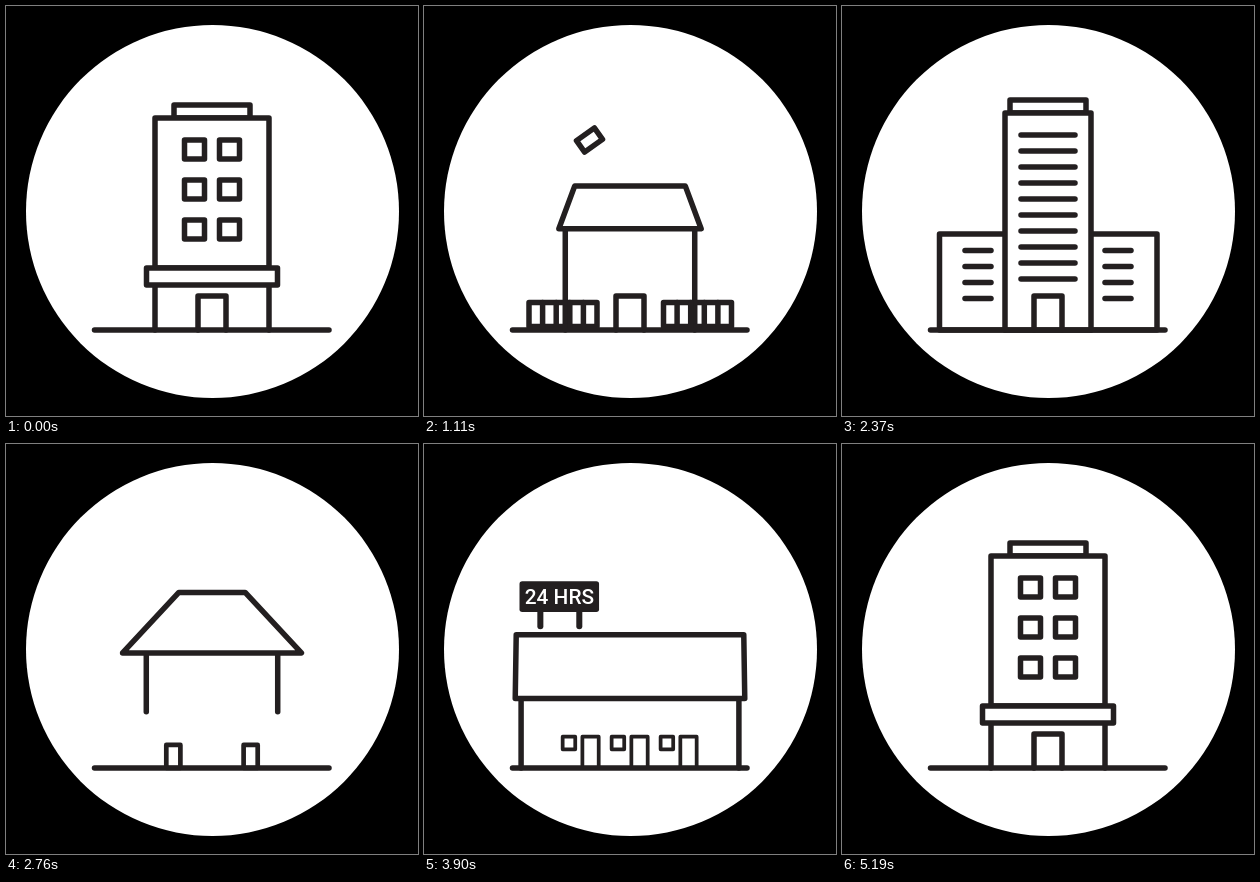
Animation of 412x410 px, one loop 5.49 s. Source, as an HTML page with a canvas:

```html
<!DOCTYPE html>
<html lang="en">
<head>
<meta charset="utf-8">
<title>Buildings</title>
<style>
  html, body { margin: 0; width: 100%; height: 100%; overflow: hidden; background: #000; }
  canvas { display: block; }
</style>
</head>
<body>
<canvas id="stage" width="412" height="410"></canvas>
<script>
const c = document.getElementById('stage').getContext('2d');
const LOOP = 5490, MID = 206, GROUND = 324, INK = '#231f20';
let now = 0;

const clamp = u => Math.min(1, Math.max(0, u));
const spring = u => 1 - Math.exp(-5 * u) * (1 - u) * Math.cos(9 * u);
const easeIn = u => u * u;
const easeOut = u => 1 - (1 - u) ** 2;
const backIn = u => u * u * (2.7 * u - 1.7);

// Main shape: half width at top and bottom, top y, bottom y; then half width and foot of the walls.
const pose = {
  tower: [57, 57, 112, 262, 57, GROUND],
  house: [33, 90, 149, 207.5, 65, GROUND],
  squash: [55.5, 71.5, 181, 221.5, 65, GROUND],
  office: [43, 43, 107, GROUND, 43, GROUND],
  bungalow: [33, 90, 149, 207.5, 66, 267],
  wide: [114, 115, 191, 254.5, 109, GROUND],
  motel: [105, 105.5, 183.5, 254, 105, GROUND]
};
const morphs = [
  [150, 600, 'house', spring],
  [1000, 1110, 'squash', easeIn],
  [1110, 1600, 'office', spring],
  [2480, 2950, 'bungalow', spring],
  [3300, 3900, 'wide', easeOut],
  [3900, 4150, 'motel', spring],
  [4650, 5150, 'tower', spring]
];

function shapeAt(t) {
  let cur = pose.tower;
  for (const [from, to, name, ease] of morphs) {
    if (t < from) break;
    const k = ease(clamp((t - from) / (to - from)));
    cur = cur.map((v, i) => v + (pose[name][i] - v) * k);
  }
  return cur;
}

// Scale of a part that springs in at one time and shrinks away at another, across the loop if needed.
function pop(start, end) {
  let t = now;
  if (end < start) {
    end += LOOP;
    if (t < start) t += LOOP;
  }
  if (t <= start) return 0;
  return Math.max(0, spring(clamp((t - start) / 300)) - backIn(clamp((t - end) / 150)));
}

function part(start, end, x, y, draw) {
  const s = pop(start, end);
  if (s < 0.01) return;
  c.save();
  c.translate(x, y);
  c.scale(s, s);
  c.translate(-x, -y);
  draw();
  c.restore();
}

function path(points, closed) {
  c.beginPath();
  points.forEach(p => c.lineTo(...p));
  if (closed) {
    c.closePath();
    c.fill();
  }
  c.stroke();
}
const line = (x1, y1, x2, y2) => path([[x1, y1], [x2, y2]]);
const box = (x, y, w, h) => path([[x, y], [x + w, y], [x + w, y + h], [x, y + h]], true);

function rails(x, y, w, h, n) {
  box(x, y, w, h);
  for (let i = 1; i < n; i++) line(x + w * i / n, y, x + w * i / n, y + h);
}

function rooms(floor) {
  for (let i = 0; i < 3; i++) {
    const x = 107 + 72 * i;
    box(x, floor - 46, 18.5, 18.5);
    path([[x + 29, floor], [x + 29, floor - 46], [x + 53, floor - 46], [x + 53, floor]]);
  }
}

function stripe(start, x, y, w) {
  const s = pop(start, 2400);
  if (s > 0.01) line(x, y, x + w * s, y);
}

function chimney() {
  const k = easeOut(clamp((now - 1000) / 110));
  const s = pop(540, 1110);
  if (s < 0.01) return;
  c.save();
  c.translate(158 + 7.5 * k, 152 - 18 * k);
  c.rotate((54 * k + 0.4 * Math.max(0, now - 1110)) * Math.PI / 180);
  c.scale(s, s);
  box(-7, -11, 14, 22);
  c.restore();
}

function sign() {
  c.fillStyle = INK;
  line(118, 170, 118, 183);
  line(153.5, 170, 153.5, 183);
  c.beginPath();
  c.roundRect(99, 142, 72.5, 28, 2.5);
  c.fill();
  c.fillStyle = '#fff';
  c.font = '500 19px Roboto, sans-serif';
  c.fillText('24 HRS', 135.3, 156.8);
}

function draw() {
  const [top, bottom, y, rawBase, wall, rawFoot] = shapeAt(now);
  const base = Math.min(rawBase, GROUND), foot = Math.min(rawFoot, GROUND);

  c.fillStyle = '#000';
  c.fillRect(0, 0, 412, 410);
  c.fillStyle = '#fff';
  c.beginPath();
  c.arc(206.5, 205.5, 186.5, 0, 7);
  c.fill();
  c.strokeStyle = INK;
  c.lineWidth = 5.5;
  c.lineCap = c.lineJoin = 'round';
  c.textAlign = 'center';
  c.textBaseline = 'middle';

  // Behind the main shape
  const wings = pop(1380, 2430);
  if (wings > 0.02) box(97.5, GROUND - 96 * wings, 217.5, 96 * wings);
  const cap = () => box(168, y - 13, 76, 13);
  part(4860, 50, MID, y, cap);
  part(1330, 2420, MID, y, cap);
  chimney();
  part(3790, 4660, 135, 190, sign);
  part(2720, 3330, MID, GROUND, () => {
    box(152.5, 297, 16.5, 27);
    box(243, 297, 16.5, 27);
  });

  for (const side of [-1, 1]) line(MID + side * wall, base, MID + side * wall, foot);
  path([[MID - top, y], [MID + top, y], [MID + bottom, base], [MID - bottom, base]], true);

  // Tower
  for (let i = 0; i < 6; i++) {
    const x = 188.5 + 35 * (i % 2), wy = 143.5 + 40 * (i >> 1);
    part(4890 + 8 * i, 30 + 10 * i, x, wy, () => box(x - 10, wy - 9.5, 20, 19));
  }
  part(4860, 120, MID, 270, () => box(140.5, 262, 131, 17));
  part(4850, 2400, MID, GROUND, () =>
    path([[192, GROUND], [192, 290], [220, 290], [220, GROUND]]));

  // House
  for (const x of [105, 239.5])
    part(600, 1120, x + 34, GROUND, () => {
      c.fillStyle = 'transparent';
      rails(x, 296.5, 68, 24, 5);
    });

  // Office
  for (let i = 0; i < 10; i++) stripe(1650 + 25 * i, 179, 129 + 16 * i, 54);
  for (let i = 0; i < 4; i++)
    for (const x of [123, 263]) stripe(1750 + 60 * i, x, 244.5 + 16 * i, 26);

  // Bungalow
  part(2800, 3280, MID, 234, () => box(165, 220.5, 82.5, 27));
  part(2780, 3290, MID, 282, () => rails(122, 267.5, 168, 29.5, 10));

  // Motel
  part(3930, 4640, MID, base, () => rooms(base));
  part(3870, 4498, MID, GROUND, () => rooms(GROUND));

  line(88.5, GROUND, 323, GROUND);
}

function tick() {
  now = performance.now() % LOOP;
  draw();
  requestAnimationFrame(tick);
}
tick();
</script>
</body>
</html>
```
